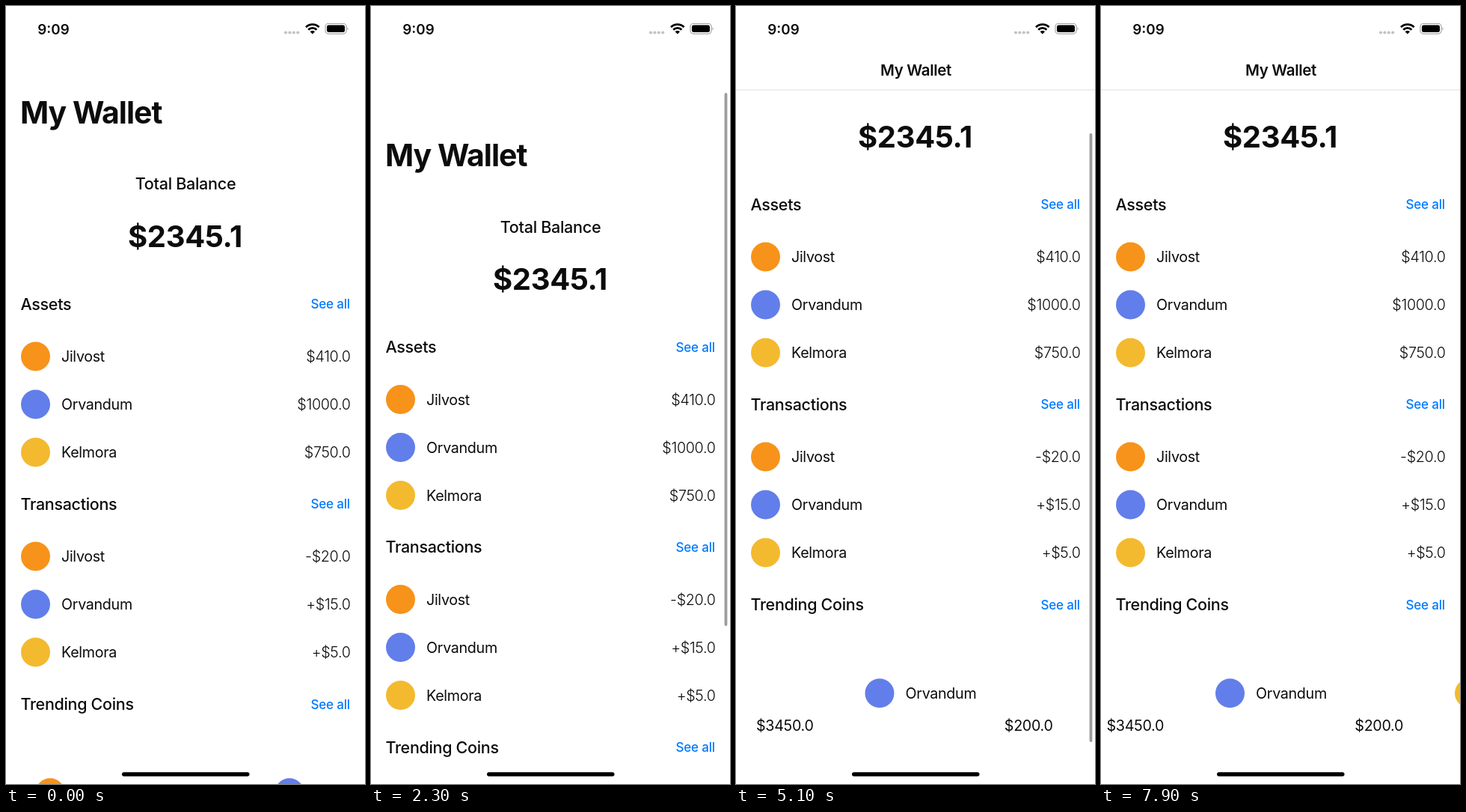
An HTML page for the animation above (8000 ms loop, 480 px wide and 1039 px high).

```html
<!DOCTYPE html>
<html lang="en">
<head>
<meta charset="utf-8">
<title>My Wallet</title>
<style>
  html, body { margin: 0; width: 100%; height: 100%; overflow: hidden; background: #fff; }
  svg { display: block; width: 100%; height: 100%; font-family: Inter, Roboto, sans-serif; letter-spacing: -.02em; }
</style>
</head>
<body>
<svg id="stage" viewBox="0 0 480 1039">
  <g id="content"></g>
  <rect width="480" height="114" fill="#fff"/>
  <g id="navbar"><path d="M0 112h480" stroke="#dfdfe0" stroke-width="1.2"/></g>
  <g id="status">
    <g fill="#c4c4c6">
      <circle cx="374" cy="35.5" r="2.1"/><circle cx="379.4" cy="35.5" r="2.1"/>
      <circle cx="384.8" cy="35.5" r="2.1"/><circle cx="390.2" cy="35.5" r="2.1"/>
    </g>
    <g fill="none" stroke="#000" stroke-width="2.7">
      <path d="M401 28.2a12.4 12.4 0 0 1 17.6 0"/>
      <path d="M404.2 31.7a8 8 0 0 1 11.2 0"/>
    </g>
    <path d="M406.6 34.2a4.6 4.6 0 0 1 6.4 0l-3.2 3.3z"/>
    <rect x="427" y="23.5" width="28" height="13.6" rx="4" fill="none" stroke="#a2a2a2" stroke-width="1.2"/>
    <rect x="429" y="25.5" width="24" height="9.6" rx="2.4"/>
    <path d="M456.5 28.2q2.4 2.1 0 4.2z" fill="#a2a2a2"/>
  </g>
  <rect id="scrollbar" x="472.6" width="3.8" rx="1.9" fill="#9d9d9d"/>
  <rect x="155" y="1023.2" width="170.5" height="5.6" rx="2.8"/>
</svg>
<script>
const LOOP = 8000, STEP = 100, DECAY = 5.4;
const MAX_SCROLL = 133, CARD_STRIDE = 320;
const coins = [
  { name: 'Jilvost', color: '#f7931a' },
  { name: 'Orvandum', color: '#627eea' },
  { name: 'Kelmora', color: '#f3ba2f' }
];

// Each key is [time, value, settle]; settling keys approach their value exponentially.
const scrollKeys = [
  [0, 0], [400, 0], [500, 45], [600, 150], [700, 224], [800, 224], [1800, 133, true],
  [1900, 133], [2000, 105], [2100, 45], [2200, -25], [2300, -57.5], [2500, -57.5], [3400, 0, true],
  [3500, 35], [3600, 120], [3700, 195], [3800, 219], [4500, 133, true], [LOOP, 133]
];
const carouselKeys = [
  [0, 0], [4700, 0], [4800, 45], [4900, 100], [5000, 100], [5100, 187], [5900, 490, true],
  [6700, 551], [6900, 551], [7800, 490, true], [7900, 206.5], [LOOP, 206.5]
];
const scrollbarOpacityKeys = [[0, 0], [400, 0], [500, 1], [5900, 1], [6300, 0], [LOOP, 0]];

const byId = id => document.getElementById(id);
const content = byId('content'), navbar = byId('navbar'), scrollbar = byId('scrollbar');

function add(parent, tag, attributes, text = '') {
  const node = document.createElementNS('http://www.w3.org/2000/svg', tag);
  for (const key in attributes) node.setAttribute(key, attributes[key]);
  node.textContent = text;
  return parent.appendChild(node);
}

// Places text so that its capitals are centred on y.
function label(parent, text, x, y, size, options = {}) {
  add(parent, 'text', { x, y: y + size * .364, 'font-size': size, fill: '#0c0c0d', ...options }, text);
}

const rightAligned = { 'text-anchor': 'end' };
const centred = { 'text-anchor': 'middle' };

function coin(parent, { name, color }, x, y) {
  add(parent, 'circle', { cx: x, cy: y, r: 19.5, fill: color });
  label(parent, name, x + 34.5, y, 19.7);
}

function section(title, y, prices = []) {
  label(content, title, 19.5, y, 21.5, { 'font-weight': 450 });
  label(content, 'See all', 460, y, 17, {
    ...rightAligned, fill: '#007aff', 'font-weight': 450, 'letter-spacing': '-.01em'
  });
  prices.forEach((price, i) => {
    const rowY = y + 70 + i * 64;
    coin(content, coins[i], 39.5, rowY);
    label(content, price, 460.5, rowY, 19.7, { ...rightAligned, 'font-weight': 300 });
  });
}

label(content, 'My Wallet', 19, 142, 41, { 'font-weight': 700, 'letter-spacing': '-.025em' });
label(content, 'Total Balance', 240, 237.5, 21.6, { ...centred, 'font-weight': 450 });
label(content, '$2345.1', 239.5, 307.3, 40, { ...centred, 'font-weight': 700 });
section('Assets', 398, ['$410.0', '$1000.0', '$750.0']);
section('Transactions', 665, ['-$20.0', '+$15.0', '+$5.0']);
section('Trending Coins', 932.5);

const carousel = add(content, 'g');
['$3450.0', '$200.0', '$450.0'].forEach((price, i) => {
  const x = i * CARD_STRIDE;
  coin(carousel, coins[i], x + 59, 1050.7);
  label(carousel, price, x + 290.5, 1094, 19.7, rightAligned);
});

label(navbar, 'My Wallet', 240.5, 85.5, 20.5, { ...centred, 'font-weight': 600 });
label(byId('status'), '9:09', 42.3, 31, 18.8, { 'font-weight': 600, 'letter-spacing': 0 });

function valueAt(keys, time) {
  const i = keys.findIndex(key => key[0] > time);
  const [startTime, start] = keys[i - 1], [endTime, end, settle] = keys[i];
  if (settle) return end + (start - end) * Math.exp(-DECAY * (time - startTime) / 1000);
  return start + (end - start) * (time - startTime) / (endTime - startTime);
}

function render(time) {
  const scroll = valueAt(scrollKeys, time);
  content.setAttribute('transform', `translate(0 ${-scroll})`);
  carousel.setAttribute('transform', `translate(${-valueAt(carouselKeys, time)} 0)`);
  navbar.style.display = scroll > 40 ? '' : 'none';

  // The indicator shrinks by the distance pulled past either end.
  const inside = Math.min(MAX_SCROLL, Math.max(0, scroll));
  const pastEnd = Math.max(0, scroll - MAX_SCROLL);
  const progress = inside / MAX_SCROLL;
  scrollbar.setAttribute('y', 116 + 54 * progress + pastEnd);
  scrollbar.setAttribute('height', 769.5 + 43.5 * progress - Math.abs(scroll - inside));
  scrollbar.setAttribute('opacity', valueAt(scrollbarOpacityKeys, time));
}

const startTime = performance.now();
function tick() {
  const time = (performance.now() - startTime) % LOOP;
  render(Math.floor(time / STEP) * STEP);
  requestAnimationFrame(tick);
}
tick();
</script>
</body>
</html>
```
